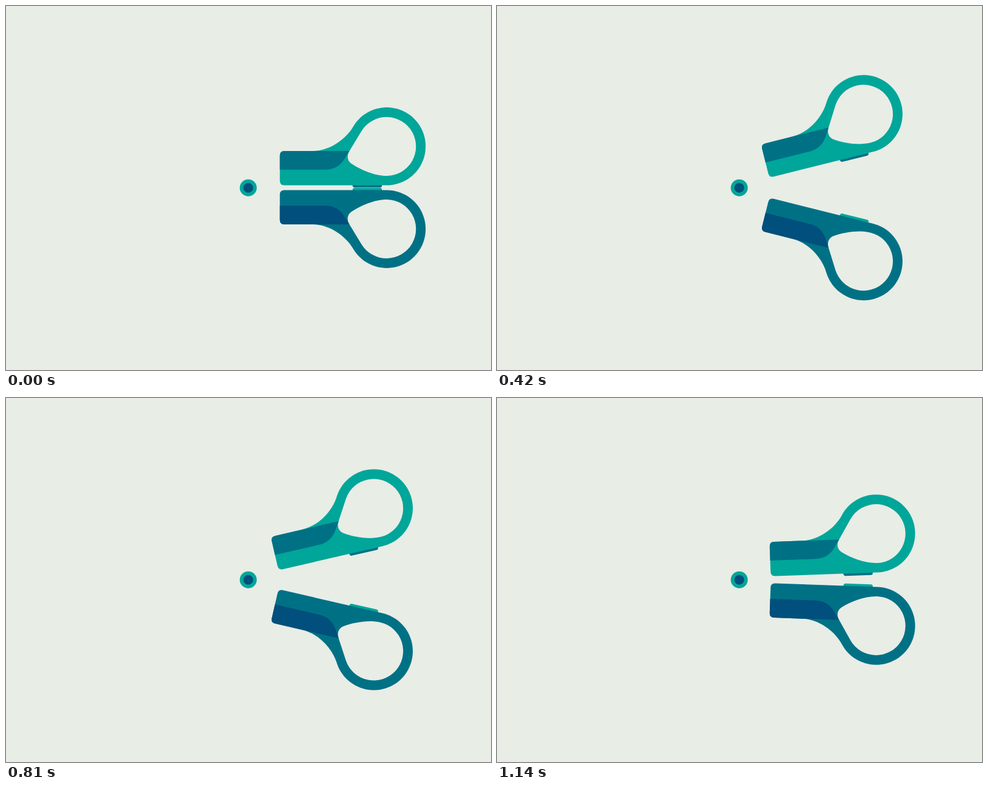
An HTML page that plays this animation: 800x600 px, repeating every 1.17 s.

```html
<!DOCTYPE html>
<html lang="en">
<head>
<meta charset="utf-8">
<title>Scissors</title>
<style>
  html, body { margin: 0; width: 100%; height: 100%; overflow: hidden; background: #e8ede6; }
  svg { display: block; width: 100%; height: 100%; }
  .teal { --body: #00a699; --inset: #007185; --stop: #007185; }
  .blue { --body: #007185; --inset: #004f7c; --stop: #00a699; }
  .body { fill: var(--body); fill-rule: evenodd; }
  .inset { fill: var(--inset); }
  .stop { fill: var(--stop); }
</style>
</head>
<body>
<svg viewBox="0 0 800 600">
  <defs>
    <g id="handle">
      <path class="stop" d="M571.5 294H620V296.5Q620 299.3 617 299.3H575Q572.5 299.3 571.5 296Z"/>
      <path class="body" d="M459 239H505C535 239 561.4 218.2 572.4 199.2
        A64.2 64.2 0 1 1 628 295.5H459Q451.7 295.5 451.7 288V246.5Q451.7 239 459 239Z
        M586.5 206L566.5 239C562 246 562.5 255 570 260C585 270 608 280 628 280
        A48.5 48.5 0 1 0 586.5 206Z"/>
      <path class="inset" d="M459 239H566.5L558 252.5Q547 269.7 527 269.7H451.7V246.5Q451.7 239 459 239Z"/>
    </g>
  </defs>
  <use id="lower" class="blue" href="#handle"/>
  <use id="upper" class="teal" href="#handle"/>
  <circle cx="399.6" cy="299.7" r="14" fill="#00a699"/>
  <circle cx="399.6" cy="299.7" r="8" fill="#004f7c"/>
</svg>
<script>
  const LOOP = 1170, STEP = 30, PEAK = 20, PIVOT = 299.5;
  const upper = document.getElementById('upper');
  const lower = document.getElementById('lower');
  const start = performance.now();

  function pose(handle, angle, flip) {
    handle.setAttribute('transform',
      `translate(399.5 ${PIVOT}) scale(1 ${flip}) rotate(${-angle}) translate(-399.5 ${-PIVOT})`);
  }

  function draw() {
    // One degree per step, opening to the peak and closing again.
    const step = Math.floor(((performance.now() - start) % LOOP) / STEP);
    const angle = PEAK - Math.abs(PEAK - step);
    pose(upper, angle, 1);
    pose(lower, angle, -1);
    requestAnimationFrame(draw);
  }
  draw();
</script>
</body>
</html>
```
